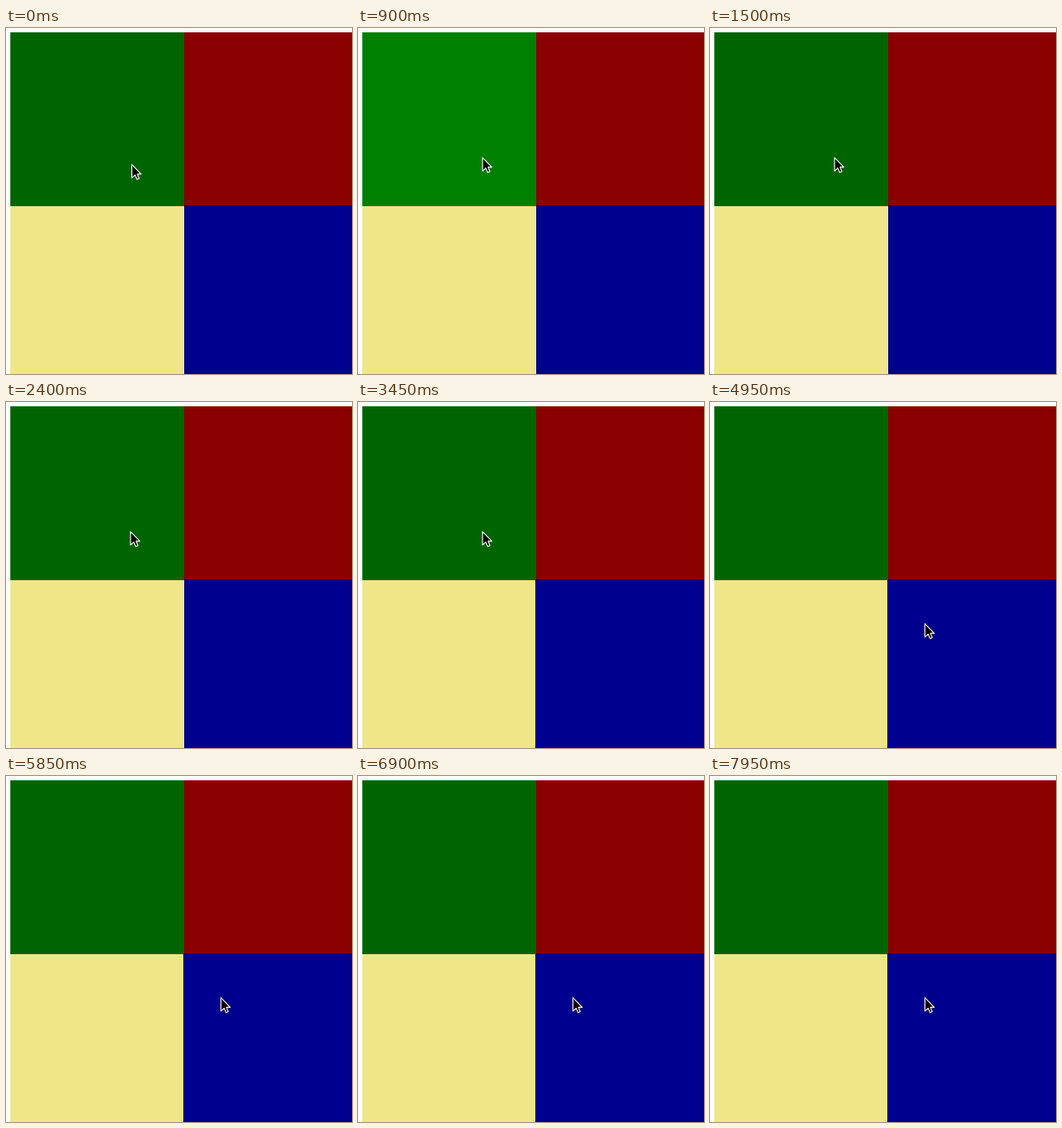
An HTML page with a canvas that plays this animation: 400 px wide and 400 px high, repeating every 8000 ms.

```html
<!DOCTYPE html>
<html lang="en">
<head>
<meta charset="utf-8">
<title>Four colour tiles</title>
<style>
  html, body { margin: 0; width: 100%; height: 100%; overflow: hidden; background: #fff; }
  canvas { display: block; }
</style>
</head>
<body>
<canvas id="stage" width="400" height="400"></canvas>
<script>
const ctx = document.getElementById('stage').getContext('2d');
const LOOP = 8000;
const TILE = 201;

const tiles = {
  red:    { x: 205, y: 5,   dark: '#8b0000', glow: '#ff0000' },
  blue:   { x: 205, y: 205, dark: '#00008e', glow: '#0000ff' },
  yellow: { x: 5,   y: 205, dark: '#efe787', glow: '#ffff00' },
  green:  { x: 5,   y: 5,   dark: '#006500', glow: '#008000' }
};

// Tile, time on, time off
const flashes = [
  ['green', 900, 1500],
  ['green', 1950, 2400],
  ['blue', 3000, 3450],
  ['green', 4200, 4800],
  ['blue', 5400, 5850],
  ['green', 6300, 6900],
  ['blue', 7350, 7950]
];

// Start time, tip x, tip y, outline
const pointerStops = [
  [0, 145, 157, '#fff'],
  [150, 143.5, 149, '#fff'],
  [4650, 147, 151, '#fff'],
  [4800, 226, 229, '#fffac8'],
  [4950, 248, 255.5, '#fffac8']
];
const arrow = new Path2D('M.5 .8V16.3L4.2 12.9L6.4 18L9 17L6.8 11.9H11.2Z');

function paint(name, shade) {
  const tile = tiles[name];
  ctx.fillStyle = tile[shade];
  ctx.fillRect(tile.x, tile.y, TILE, TILE);
}

function drawPointer(time) {
  const [, x, y, outline] = pointerStops.filter(stop => stop[0] <= time).pop();
  ctx.save();
  ctx.translate(x, y);
  ctx.fillStyle = '#000';
  ctx.strokeStyle = outline;
  ctx.lineWidth = 1.1;
  ctx.lineJoin = 'round';
  ctx.fill(arrow);
  ctx.stroke(arrow);
  ctx.restore();
}

function draw(time) {
  ctx.fillStyle = '#fff';
  ctx.fillRect(0, 0, 400, 400);
  for (const name in tiles) paint(name, 'dark');
  // Tiles overlap by one pixel; the latest flash stays on top.
  for (const [name, on, off] of flashes) {
    if (time >= on) paint(name, time < off ? 'glow' : 'dark');
  }
  drawPointer(time);
}

function tick() {
  draw(performance.now() % LOOP);
  requestAnimationFrame(tick);
}
tick();
</script>
</body>
</html>
```
